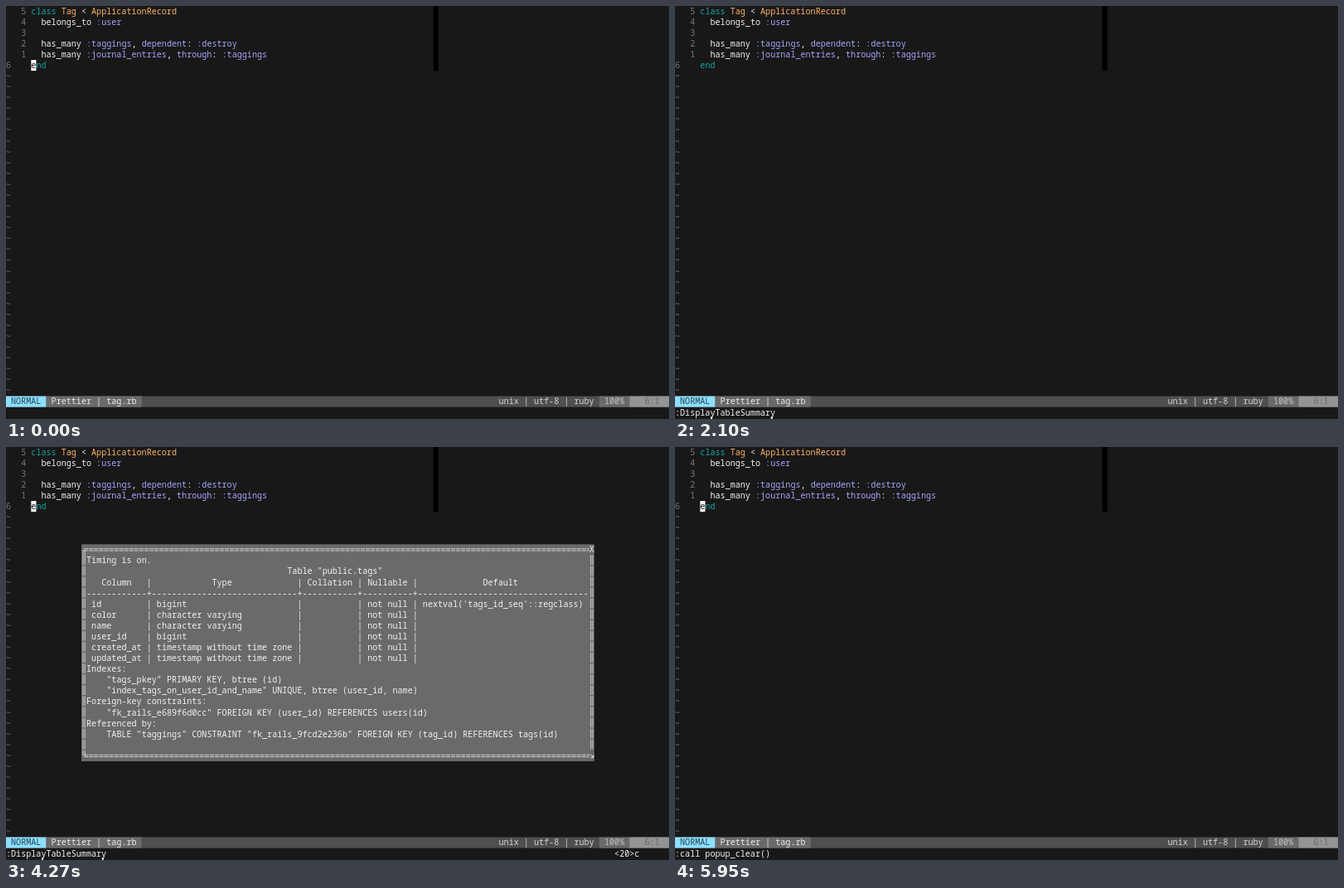
Write an HTML page that moves like this. It is 800 px wide and 498 px high and loops after 6020 ms.

```html
<!DOCTYPE html>
<html lang="en">
<head>
<meta charset="utf-8">
<title>Table summary popup</title>
<style>
  html, body { margin: 0; width: 100%; height: 100%; overflow: hidden; background: #181818; }
  svg { display: block; width: 100vw; height: 100vh; }
  text { font: 10.11px "Noto Sans Mono", "DejaVu Sans Mono", monospace; white-space: pre; font-variant-ligatures: none; }
</style>
</head>
<body>
<svg id="stage" viewBox="0 0 800 498"></svg>
<script>
(() => {
const NS = 'http://www.w3.org/2000/svg';
const LOOP = 6020, COL = 6.067, ROW = 13.08, TOP = -0.4;
const WHITE = '#f2f2f2', TEAL = '#12a5a0', ORANGE = '#ffb363', LILAC = '#a6a4fa', GRAY = '#777';
const stage = document.getElementById('stage');

function add(parent, tag, attrs = {}, content = '') {
  const node = document.createElementNS(NS, tag);
  for (const key in attrs) node.setAttribute(key, attrs[key]);
  node.textContent = content;
  return parent.appendChild(node);
}
const group = () => add(stage, 'g');
const rowTop = row => TOP + row * ROW;

function cells(parent, col, row, width, height, fill) {
  return add(parent, 'rect', { x: col * COL, y: rowTop(row), width: width * COL, height: height * ROW, fill });
}

// Parts are alternating strings and colours.
function write(parent, col, row, ...parts) {
  const line = add(parent, 'text', { x: col * COL, y: rowTop(row) + 10 });
  for (let i = 0; i < parts.length; i += 2) add(line, 'tspan', { fill: parts[i + 1] }, parts[i]);
  return line;
}

add(stage, 'rect', { width: 800, height: 498, fill: '#181818' });
cells(stage, 85, 0, 1, 6, '#000');

// Buffer
[5, 4, 3, 2, 1].forEach((n, row) => write(stage, 3, row, String(n), GRAY));
write(stage, 0, 5, '6', GRAY);
for (let row = 6; row < 36; row++) write(stage, 0, row, '~', GRAY);
write(stage, 5, 0, 'class', TEAL, ' Tag', ORANGE, ' < ', WHITE, 'ApplicationRecord', ORANGE);
write(stage, 7, 1, 'belongs_to ', WHITE, ':user', LILAC);
write(stage, 7, 3, 'has_many ', WHITE, ':taggings', LILAC, ', ', WHITE, 'dependent', LILAC, ': ', WHITE, ':destroy', LILAC);
write(stage, 7, 4, 'has_many ', WHITE, ':journal_entries', LILAC, ', ', WHITE, 'through', LILAC, ': ', WHITE, ':taggings', LILAC);
write(stage, 5, 5, 'end', TEAL);
const cursor = group();
cells(cursor, 5, 5, 1, 1, '#fff');
write(cursor, 5, 5, 'e', '#181818');

// Status line
cells(stage, 0, 36, 132, 1, '#4f4f4f');
cells(stage, 0, 36, 8, 1, '#8fdfff');
cells(stage, 8, 36, 19, 1, '#6a6a6a');
cells(stage, 118, 36, 6, 1, '#6a6a6a');
cells(stage, 124, 36, 8, 1, '#949494');
write(stage, 1, 36, 'NORMAL', '#20485a');
write(stage, 9, 36, 'Prettier | tag.rb', '#ececec');
write(stage, 98, 36, 'unix | utf-8 | ruby', '#d4d4d4');
write(stage, 119, 36, '100%', '#c4c4c4');
write(stage, 127, 36, '6:1', '#686868');

// Popup
const popup = group();
cells(popup, 15, 9, 102, 20, '#6a6a6a');

function doubleLine(x1, y1, x2, y2, dash) {
  const dx = x1 === x2 ? 1.1 : 0, dy = 1.1 - dx;
  for (const side of [-1, 1]) {
    add(popup, 'path', {
      d: `M${x1 + side * dx} ${y1 + side * dy}L${x2 + side * dx} ${y2 + side * dy}`,
      stroke: '#dedede', 'stroke-width': 0.9, 'stroke-dasharray': dash
    });
  }
}
const leftX = 15.5 * COL, rightX = 116.5 * COL, topY = rowTop(9.5), bottomY = rowTop(28.5);
for (const y of [topY, bottomY]) doubleLine(leftX, y, rightX - 3, y, `${COL - 0.8} 0.8`);
for (const x of [leftX, rightX]) doubleLine(x, rowTop(10), x, rowTop(28), `${ROW - 1.4} 1.4`);
doubleLine(leftX, topY, leftX, rowTop(10), 'none');
doubleLine(leftX, rowTop(28), leftX, bottomY, 'none');
write(popup, 116, 9, 'X', WHITE);
add(popup, 'path', {
  d: `M${rightX - 2} ${bottomY - 2}l4 4m0 -3.2v3.2h-3.2`,
  stroke: WHITE, 'stroke-width': 0.9, fill: 'none'
});

const tableRow = (name, type, fallback = '') =>
  ` ${name.padEnd(11)}| ${type.padEnd(28)}|           | not null | ${fallback}`;
[
  'Timing is on.',
  ' '.repeat(40) + 'Table "public.tags"',
  '   Column   |            Type             | Collation | Nullable |             Default',
  [12, 29, 11, 10, 34].map(n => '-'.repeat(n)).join('+'),
  tableRow('id', 'bigint', "nextval('tags_id_seq'::regclass)"),
  tableRow('color', 'character varying'),
  tableRow('name', 'character varying'),
  tableRow('user_id', 'bigint'),
  tableRow('created_at', 'timestamp without time zone'),
  tableRow('updated_at', 'timestamp without time zone'),
  'Indexes:',
  '    "tags_pkey" PRIMARY KEY, btree (id)',
  '    "index_tags_on_user_id_and_name" UNIQUE, btree (user_id, name)',
  'Foreign-key constraints:',
  '    "fk_rails_e689f6d0cc" FOREIGN KEY (user_id) REFERENCES users(id)',
  'Referenced by:',
  '    TABLE "taggings" CONSTRAINT "fk_rails_9fcd2e236b" FOREIGN KEY (tag_id) REFERENCES tags(id)'
].forEach((line, i) => write(popup, 16, 10 + i, line, WHITE));

// Command line
const summaryCommand = group(), clearCommand = group();
write(summaryCommand, 0, 37, ':DisplayTableSummary', WHITE);
for (const col of [7, 19]) {
  add(summaryCommand, 'rect', { x: col * COL + 0.6, y: 495, width: 1.8, height: 3, fill: WHITE });
}
write(clearCommand, 0, 37, ':call popup_clear()', WHITE);
const pendingKeys = write(stage, 121, 37, '', WHITE).firstChild;

const show = (node, visible) => node.setAttribute('visibility', visible ? 'visible' : 'hidden');

function draw(t) {
  const within = (from, to) => t >= from && t < to;
  show(cursor, !within(1820, 2660));
  show(popup, within(2660, 4340));
  show(summaryCommand, within(1820, 4340));
  show(clearCommand, t >= 4340);
  pendingKeys.textContent = within(4270, 4340) ? '<20>c' : within(1680, 1820) || within(4130, 4270) ? '<20>' : '';
}

const start = performance.now();
function tick() {
  draw((performance.now() - start) % LOOP);
  requestAnimationFrame(tick);
}
tick();
})();
</script>
</body>
</html>
```
